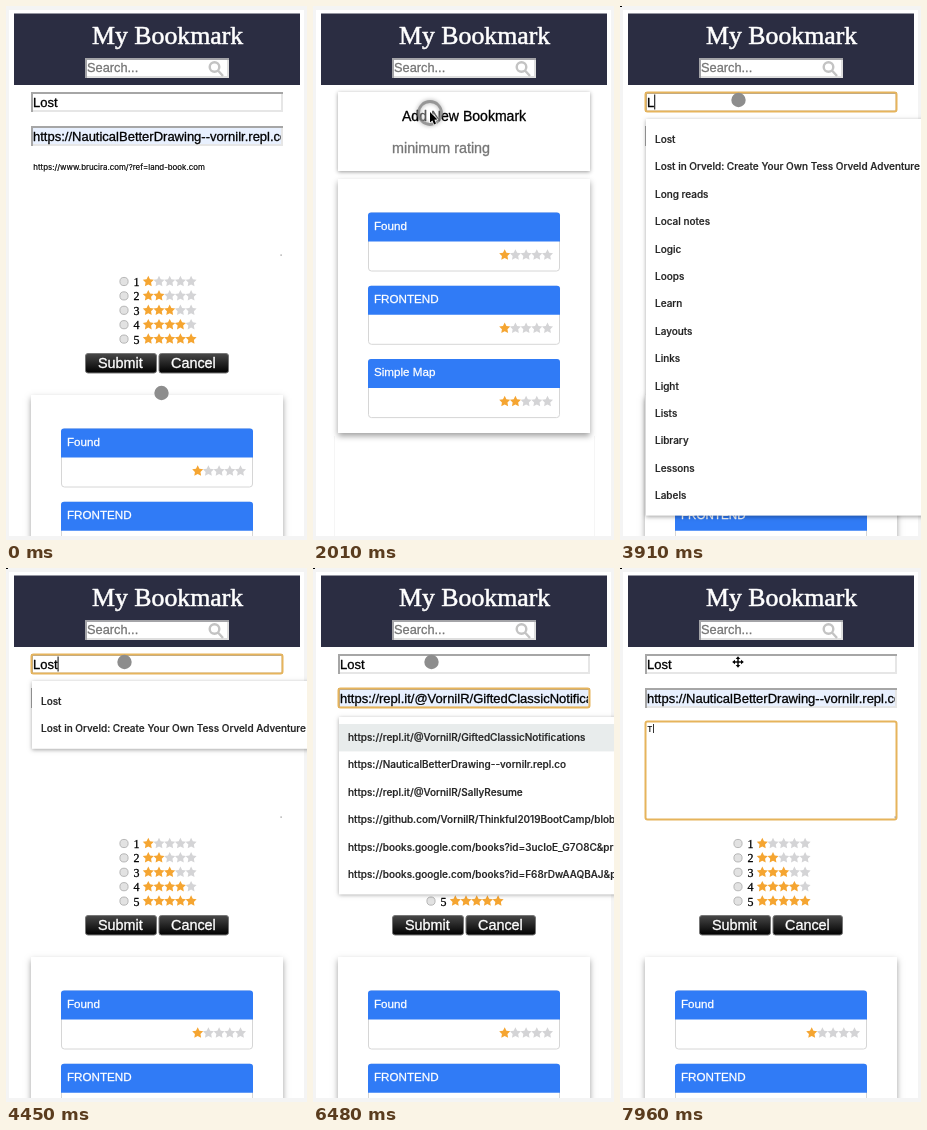
Write an HTML page with a canvas that moves like this. It is 301 by 534 pixels and loops after 8 s.

```html
<!DOCTYPE html>
<html lang="en">
<head>
<meta charset="utf-8">
<title>Bookmarks</title>
<style>
  html, body { margin: 0; width: 100%; height: 100%; overflow: hidden; background: #fff; }
  canvas { display: block; width: 301px; height: 534px; }
</style>
</head>
<body>
<canvas></canvas>
<script>
const W = 301, H = 534, LOOP = 8000;
const canvas = document.querySelector('canvas');
const g = canvas.getContext('2d');
const scale = window.devicePixelRatio || 1;
canvas.width = W * scale;
canvas.height = H * scale;

const SANS = '"Liberation Sans", Arial, sans-serif';
const SERIF = '"Liberation Serif", "Times New Roman", serif';
const UI = 'Inter, "Open Sans", sans-serif';
const ORANGE = '#f5a531', FOCUS = '#e6b45c', FILLED = '#e8f0fe';

const titles = [
  'Lost', 'Lost in Orveld: Create Your Own Tess Orveld Adventure',
  'Long reads', 'Local notes', 'Logic', 'Loops', 'Learn', 'Layouts',
  'Links', 'Light', 'Lists', 'Library', 'Lessons', 'Labels'
];
const urls = [
  'https://repl.it/@VornilR/GiftedClassicNotifications',
  'https://NauticalBetterDrawing--vornilr.repl.co',
  'https://repl.it/@VornilR/SallyResume',
  'https://github.com/VornilR/Thinkful2019BootCamp/blob/master',
  'https://books.google.com/books?id=3ucIoE_G7O8C&printsec',
  'https://books.google.com/books?id=F68rDwAAQBAJ&printsec'
];
const bookmarks = [['Found', 1], ['FRONTEND', 1], ['Simple Map', 2]];

// Each entry holds until the next one starts: [time, x, y, kind].
const pointer = [
  [0, 155, 387, 'dot'], [100, 162, 379, 'arrow'], [220, 177, 364, 'arrow'],
  [340, 186, 357, 'press'], [460, 188, 357, 'arrow'], [580, 195, 360, 'arrow'],
  [690, 199, 362, 'arrow'], [960, 196, 342, 'arrow'], [1090, 182, 275, 'arrow'],
  [1220, 150, 180, 'arrow'], [1350, 109, 98, 'arrow'], [1480, 85, 74, 'arrow'],
  [1610, 93, 89, 'arrow'], [1740, 110, 101, 'arrow'], [1870, 117, 106, 'arrow'],
  [2010, 117, 106, 'press'], [2160, 117, 105, 'arrow'], [2320, 117, 102, 'arrow'],
  [2480, 118, 97, 'arrow'], [2650, 118, 94, 'arrow'], [2820, 118, 94, 'press'],
  [2960, 118, 94, 'beam'], [3120, 118, 94, 'dot'], [7960, 118, 94, 'move']
];
const titleKeys = [[0, 'Lost'], [460, ''], [3910, 'L'], [4050, 'Lo'], [4180, 'Los'], [4320, 'Lost']];
const urlKeys = [[0, urls[1]], [460, ''], [5390, 'h'], [5800, 'ht'], [5940, 'htt'], [6480, urls[0]], [6600, urls[1]]];
const noteKeys = [[0, 'https://www.brucira.com/?ref=land-book.com'], [460, ''], [7810, 'T']];
const focusSteps = [[0, ''], [2960, 'title'], [4730, 'url'], [7270, 'note']];

const at = (steps, t) => steps.findLast(s => s[0] <= t);

function box(x, y, w, h, color) {
  g.fillStyle = color;
  g.fillRect(x, y, w, h);
}

// A hairline outline gives the letters their slightly heavy look.
function text(str, x, y, size, color = '#000', family = SANS, weight = 400) {
  g.font = `${weight} ${size}px ${family}`;
  g.fillStyle = g.strokeStyle = color;
  g.lineWidth = size / 45;
  g.lineJoin = 'round';
  g.fillText(str, x, y);
  g.strokeText(str, x, y);
}

function panel(x, y, w, h, blur, dy, alpha) {
  g.save();
  g.shadowColor = `rgba(0,0,0,${alpha})`;
  g.shadowBlur = blur * scale;
  g.shadowOffsetY = dy * scale;
  box(x, y, w, h, '#fff');
  g.restore();
}

function stars(x, y, count) {
  for (let i = 0; i < 5; i++) {
    g.beginPath();
    for (let k = 0; k < 10; k++) {
      const a = k * Math.PI / 5 - Math.PI / 2, r = k % 2 ? 2.9 : 5.8;
      g.lineTo(x + i * 10.7 + r * Math.cos(a), y + r * Math.sin(a));
    }
    g.fillStyle = i < count ? ORANGE : '#d4d4d6';
    g.fill();
  }
}

function focusRing(x, y, w, h) {
  g.beginPath();
  g.roundRect(x, y, w, h, 2);
  g.strokeStyle = FOCUS;
  g.lineWidth = 2;
  g.stroke();
}

function field(y, value, hint, focused, caret, background) {
  box(25, y, 252, 20, '#e6e6e6');
  box(25, y, 252, 2, '#a6a6a6');
  box(25, y, 2, 20, '#a6a6a6');
  box(27, y + 2, 248, 16, background);
  if (focused) focusRing(25.5, y + .5, 251, 19);
  g.save();
  g.beginPath();
  g.rect(27, y, 248, 20);
  g.clip();
  text(value || hint, 27, y + 14.6, 13, value ? '#000' : '#757575');
  if (focused && caret) box(27 + g.measureText(value).width, y + 2.5, 1, 15, '#000');
  g.restore();
}

function dropdown(top, rows, selected = -1) {
  panel(26, top, 290, rows.length * 27.4 + 13, 4, 1, .35);
  rows.forEach((row, i) => {
    const y = top + 7 + i * 27.4;
    if (i === selected) box(26, y, 275, 27.4, '#e8ecec');
    text(row, 35, y + 16.9, 10, '#222', UI, 500);
  });
}

function header() {
  box(8, 7.5, 286, 71.5, '#2b2d42');
  text('My Bookmark', 86, 37.8, 25.8, '#fff', SERIF);
  box(79, 52, 144, 20, '#a4a4a8');
  box(81, 54, 142, 18, '#dedede');
  box(81, 54, 140, 16, '#fff');
  text('Search...', 81, 66.3, 12.8, '#757575');
  g.strokeStyle = '#c3c3c3';
  g.lineWidth = 2.4;
  g.beginPath();
  g.arc(208.5, 61, 4.8, 0, 7);
  g.moveTo(212, 64.5);
  g.lineTo(217, 70);
  g.stroke();
}

function bookmarkList(top) {
  panel(25, top, 252, 254, 6, 3, .38);
  bookmarks.forEach(([name, rating], i) => {
    const y = top + 33.5 + i * 73.3;
    g.beginPath();
    g.roundRect(55.5, y + .5, 191, 58, 3);
    g.strokeStyle = '#d6d6d6';
    g.lineWidth = 1;
    g.stroke();
    g.beginPath();
    g.roundRect(55, y, 192, 29, [3, 3, 0, 0]);
    g.fillStyle = '#307bf6';
    g.fill();
    text(name, 61, y + 17.3, 11.65, '#fff');
    stars(191.7, y + 42.5, rating);
  });
}

function listPage() {
  box(21, 430, 1, 100, '#f5f5f5');
  box(281, 430, 1, 100, '#f5f5f5');
  panel(25, 86, 252, 79, 4, 1, .4);
  text('Add New Bookmark', 89, 115, 14.05);
  text('minimum rating', 79, 147, 14.35, '#777');
  bookmarkList(173);
}

function button(label, x, w, labelX) {
  const shade = g.createLinearGradient(0, 347, 0, 367);
  shade.addColorStop(0, '#4a4a4a');
  shade.addColorStop(1, '#000');
  g.beginPath();
  g.roundRect(x + .5, 347.5, w - 1, 19.5, 2.5);
  g.fillStyle = shade;
  g.fill();
  g.strokeStyle = '#777';
  g.lineWidth = 1;
  g.stroke();
  text(label, labelX, 362.2, 14.4, '#fff');
}

function formPage(t) {
  const focus = at(focusSteps, t)[1];
  const title = at(titleKeys, t)[1], url = at(urlKeys, t)[1], note = at(noteKeys, t)[1];
  const caret = !(t >= 3500 && t < 3910) && !(t >= 4990 && t < 5390);

  field(86, title, 'book title', focus === 'title', caret, '#fff');
  field(120, url, 'url:http://', focus === 'url', caret, url.length > 3 ? FILLED : '#fff');

  text(note, 27.3, 163.5, 7.9, '#000', UI);
  if (focus === 'note') {
    box(28 + g.measureText(note).width, 156, .8, 9, '#000');
    focusRing(25.5, 153.5, 251, 98);
  }
  box(274.5, 248.5, 1.2, 1.2, '#888');

  for (let n = 1; n <= 5; n++) {
    const y = 275.5 + (n - 1) * 14.4;
    g.beginPath();
    g.arc(118, y, 4.1, 0, 7);
    g.fillStyle = '#e2e2e2';
    g.fill();
    g.strokeStyle = '#b0b0b0';
    g.lineWidth = .9;
    g.stroke();
    text(n, 127.5, y + 4.5, 12, '#000', SERIF);
    stars(142.3, y, n);
  }
  button('Submit', 79, 72, 92);
  button('Cancel', 152.5, 70.5, 165);
  bookmarkList(389);

  if (t >= 3910 && t < 4580) dropdown(113, titles.filter(s => s.startsWith(title)));
  if (t >= 4730 && t < 6890) {
    const rows = url ? urls : [...urls.slice(2), ...urls.slice(0, 2)];
    dropdown(149, rows, urls.indexOf(url));
  }
}

function polygon(points) {
  g.beginPath();
  points.forEach(p => g.lineTo(...p));
  g.closePath();
}

function drawPointer([, x, y, kind]) {
  g.save();
  g.translate(x, y);
  if (kind === 'dot') {
    g.beginPath();
    g.arc(.5, 0, 7.2, 0, 7);
    g.fillStyle = '#8d8d8d';
    g.fill();
  } else if (kind === 'beam') {
    box(0, -5, 1, 10, '#333');
  } else if (kind === 'move') {
    box(-4, -.7, 8, 1.4, '#000');
    box(-.7, -4, 1.4, 8, '#000');
    for (let i = 0; i < 4; i++) {
      polygon([[-2.3, -3], [0, -5.8], [2.3, -3]]);
      g.fill();
      g.rotate(Math.PI / 2);
    }
  } else {
    if (kind === 'press') {
      g.save();
      g.beginPath();
      g.arc(0, 1, 11.5, 0, 7);
      g.fillStyle = 'rgba(255,255,255,.35)';
      g.fill();
      g.shadowColor = 'rgba(0,0,0,.45)';
      g.shadowBlur = 4 * scale;
      g.strokeStyle = 'rgba(130,130,130,.75)';
      g.lineWidth = 2.8;
      g.stroke();
      g.restore();
    }
    polygon([[0, 0], [0, 10.5], [2.4, 8.4], [4.1, 12.4], [6, 11.6], [4.4, 7.7], [7.5, 7.5]]);
    g.fillStyle = '#000';
    g.strokeStyle = '#fff';
    g.lineWidth = 1.2;
    g.stroke();
    g.fill();
  }
  g.restore();
}

function draw(now) {
  const t = now % LOOP;
  g.setTransform(scale, 0, 0, scale, 0, 0);
  box(0, 0, W, H, '#f4f4f4');
  box(3, 4, 295, 526, '#fff');
  g.save();
  g.beginPath();
  g.rect(0, 0, W, 530);
  g.clip();
  header();
  if (t >= 460 && t < 2160) listPage();
  else formPage(t);
  drawPointer(at(pointer, t));
  g.restore();
  if (t >= 2160) box(0, 0, 2, 1, '#000');
  requestAnimationFrame(draw);
}
requestAnimationFrame(draw);
</script>
</body>
</html>
```
